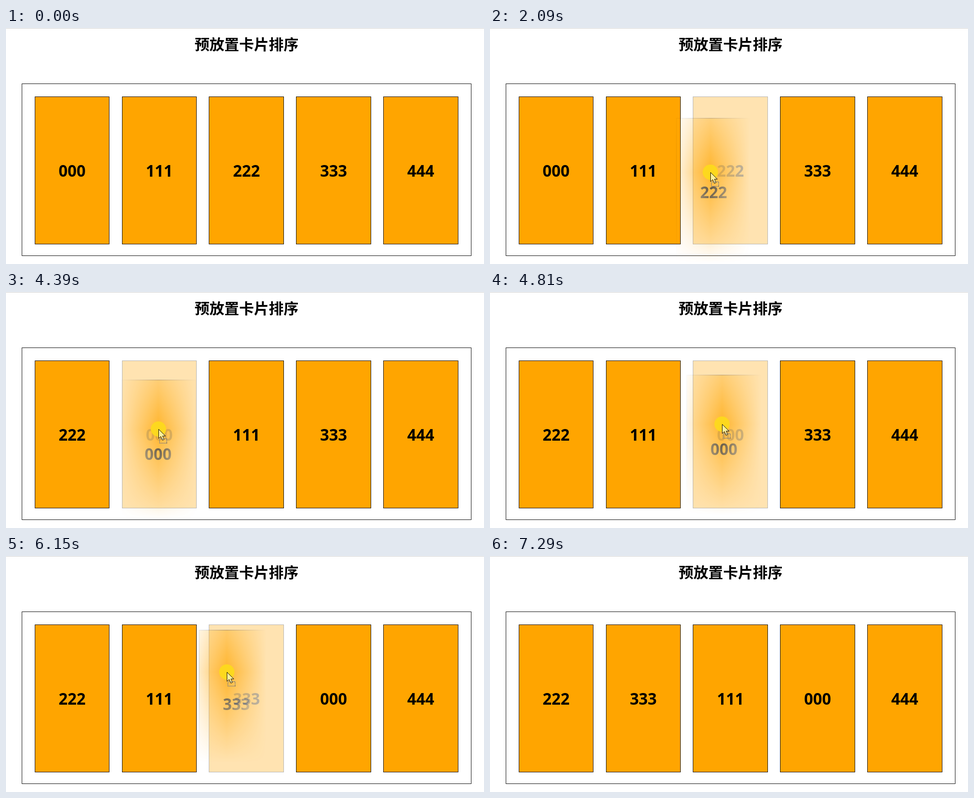
An HTML page for the animation above (8.32 s loop, 1063 px wide and 527 px high).

```html
<!DOCTYPE html>
<html lang="zh-CN">
<head>
<meta charset="utf-8">
<title>卡片排序</title>
<style>
html, body { margin: 0; width: 100%; height: 100%; overflow: hidden; background: #fff; }
#stage { position: relative; width: 1063px; height: 527px; overflow: hidden; color: #000; }
#stage * { position: absolute; box-sizing: border-box; }
#rule { left: 0; top: 0; width: 100%; height: 1px; background: #ccc; }
h1 { margin: 0; left: 0; top: 14px; width: 1070px; text-align: center; white-space: nowrap;
  font: bold 33px/42px "Noto Sans CJK SC", "Noto Sans CJK", sans-serif; }
#box { left: 35px; top: 124px; width: 1000px; height: 385px; border: 1px solid #000; }
.card { top: 153px; width: 166.65px; height: 330px; border: 1px solid #000; background: #ffa500;
  text-align: center; font: bold 35px/329px "Open Sans", "Noto Sans", sans-serif; }
/* The drag image fades away from the pointer at --x, --y */
#ghost { opacity: .74;
  mask-image:
    linear-gradient(90deg, transparent calc(var(--x) - 88px), #000 var(--x), transparent calc(var(--x) + 88px)),
    linear-gradient(transparent calc(var(--y) - 203px), #000 var(--y), transparent calc(var(--y) + 203px));
  mask-composite: intersect; }
#pointer { left: 0; top: 0; width: 1px; height: 1px; overflow: visible; }
</style>
</head>
<body>
<div id="stage">
  <div id="rule"></div>
  <h1>预放置卡片排序</h1>
  <div id="box"></div>
  <div id="cards"></div>
  <div id="ghost" class="card"></div>
  <svg id="pointer">
    <circle id="press" r="17" fill="#fddb1c" fill-opacity=".93"/>
    <path id="arrow" d="M.5 .5V21L5.3 16.6 9 25 12.7 23.3 9.2 15.6H15.5Z" stroke="#000"/>
    <g id="badge" fill="none" shape-rendering="crispEdges">
      <rect x="2.5" y="21.5" width="16" height="10" stroke="#fff"/>
      <rect x="2.5" y="21.5" width="16" height="10" stroke="#000" stroke-dasharray="1 1"/>
    </g>
  </svg>
</div>
<script>
const LOOP = 8320, LEFT = 63.75, WIDTH = 166.65, PITCH = 193.8;
const DRIFT = .027; // the drag image travels slightly further than the pointer
const $ = id => document.getElementById(id);

// Pointer stops: arrival time, departure time, x, y
const stops = [
  [190, 190, 873, 447], [330, 930, 620, 362], [1340, 1540, 573, 343],
  [1680, 1810, 527, 274], [2090, 2090, 490, 322], [2600, 3290, 388, 314],
  [3560, 3630, 148, 263], [4120, 4390, 339, 306], [5280, 5610, 713, 282],
  [5950, 6050, 515, 247], [6480, 6480, 411, 296], [6690, 6760, 345, 300],
  [7230, 7290, 1050, 512]];

// grip is the held point inside the card, dir the way it is carried
const drags = [
  { card: "2", press: 1680, start: 1810, end: 3030, dir: -1, grip: [75, 121] },
  { card: "0", press: 3560, start: 3630, end: 5610, dir: 1, grip: [89, 110] },
  { card: "3", press: 5950, start: 6050, end: 6760, dir: -1, grip: [61, 94] }];

const cards = [..."01234"].map(n => {
  const el = document.createElement("div");
  el.className = "card";
  el.textContent = n.repeat(3);
  $("cards").append(el);
  return el;
});

const show = (el, on) => el.style.display = on ? "" : "none";

function pointerAt(t) {
  const i = stops.findIndex(s => s[0] > t);
  if (i < 1) return stops.at(i).slice(2);
  const [a, b] = [stops[i - 1], stops[i]];
  const u = Math.max(0, (t - a[1]) / (b[0] - a[1]));
  return [2, 3].map(j => Math.round(a[j] + (b[j] - a[j]) * u));
}

// The slot entered last on the way to x
const slotAt = (x, dir) => dir > 0
  ? Math.floor((x - LEFT) / PITCH)
  : Math.ceil((x - LEFT - WIDTH) / PITCH);

// A dragged card takes the slot under the pointer; the others close up
function orderAt(t) {
  const order = [..."01234"];
  for (const d of drags.filter(d => t >= d.start)) {
    const [x] = pointerAt(Math.min(t, d.end));
    order.splice(order.indexOf(d.card), 1);
    order.splice(slotAt(x, d.dir), 0, d.card);
  }
  return order;
}

function drawGhost(drag, x, y) {
  const ghost = $("ghost"), [gx, gy] = drag.grip;
  const left = Math.round(x - gx + DRIFT * (x - pointerAt(drag.start)[0]));
  ghost.textContent = drag.card.repeat(3);
  ghost.style.left = left + "px";
  ghost.style.top = y - gy + "px";
  ghost.style.setProperty("--x", x - left + "px");
  ghost.style.setProperty("--y", gy + "px");
}

function draw(t) {
  const [x, y] = pointerAt(t);
  const held = drags.find(d => t >= d.press && t < d.end);
  const dragging = held && t >= held.start;

  orderAt(t).forEach((n, slot) => {
    cards[n].style.left = LEFT + PITCH * slot + "px";
    cards[n].style.opacity = dragging && n === held.card ? .3 : 1;
  });

  show($("ghost"), dragging);
  if (dragging) drawGhost(held, x, y);

  show($("pointer"), t >= 190 && t < 7290);
  $("pointer").style.transform = `translate(${x}px, ${y}px)`;
  show($("press"), held);
  show($("badge"), dragging);
  $("arrow").setAttribute("fill", held ? "#fff09a" : "#fff");
}

function tick() {
  draw(performance.now() % LOOP);
  requestAnimationFrame(tick);
}
tick();
</script>
</body>
</html>
```
